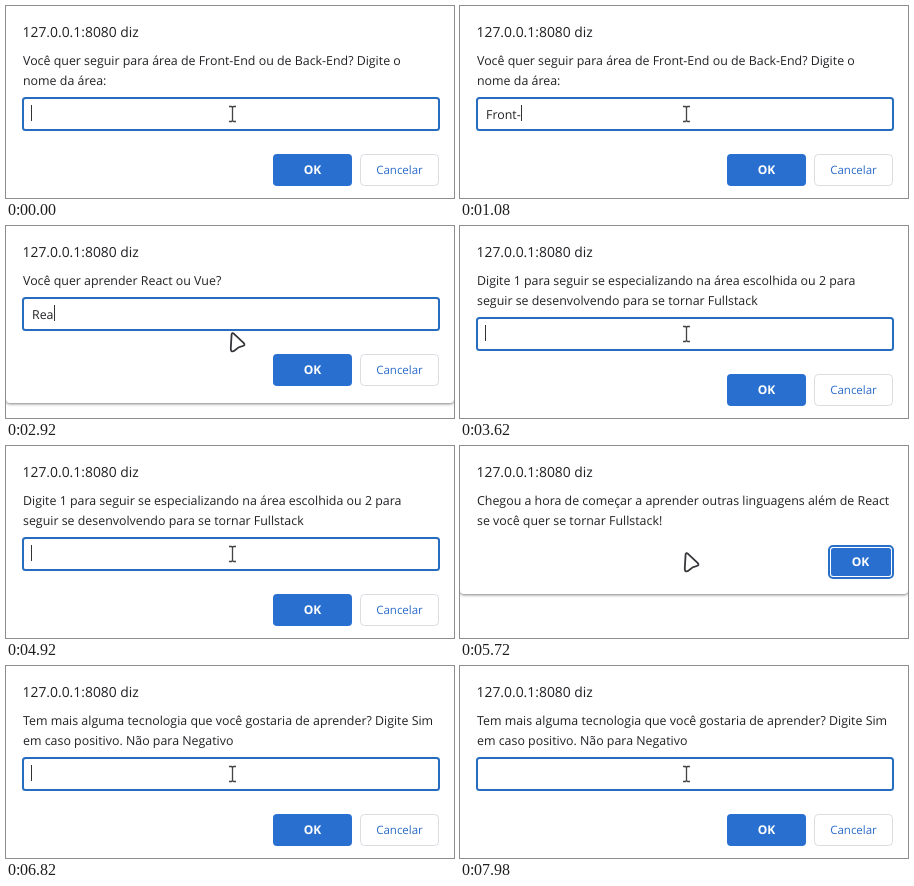
Write an HTML page that moves like this. It is 448 px wide and 192 px high and loops after 8000 ms.

```html
<!DOCTYPE html>
<html lang="pt-BR">
<head>
<meta charset="utf-8">
<title>Caixas de diálogo</title>
<style>
  html, body { margin: 0; width: 100%; height: 100%; overflow: hidden; background: #fff; }
  svg { display: block; width: 448px; height: 192px; font-family: "Open Sans", "Noto Sans", sans-serif; }
  text { white-space: pre; fill: #202124; font-size: 12.4px; text-rendering: geometricPrecision; }
  .title { font-size: 13.9px; }
  .label { font-size: 11.5px; font-weight: 500; text-anchor: middle; fill: #2a6cc8; }
  .light { font-size: 12px; font-weight: 700; fill: #fff; }
  .panel { fill: #fff; filter: drop-shadow(0 1px 1.5px rgba(0, 0, 0, .5)); }
  .field { fill: #fff; stroke: #266dc0; stroke-width: 2; }
  .primary { fill: #286fd0; }
  .plain { fill: #fff; stroke: #dadce0; }
  .ring { fill: #fff; stroke: #286fc8; stroke-width: 2; }
  .caret { fill: #333; }
  .pointer { fill: #fff; stroke: #35353a; stroke-width: 1.8; stroke-linejoin: round; }
  .beam { fill: none; stroke: #444; stroke-width: 1.3; }
</style>
</head>
<body>
<svg viewBox="0 0 448 192" aria-label="Sequência de perguntas"></svg>
<script>
const LOOP = 8000, BLINK = 650;
const svg = document.querySelector('svg');

// start: when the dialog opens; typeAt and keyMs: typing start and pace
const dialogs = [
  { start: 0, lines: ['Você quer seguir para área de Front-End ou de Back-End? Digite o', 'nome da área:'],
    answer: 'Front-End', typeAt: 640, keyMs: 80 },
  { start: 1640, lines: ['Você quer aprender React ou Vue?'],
    answer: 'React', typeAt: 2640, keyMs: 100 },
  { start: 3420, lines: ['Digite 1 para seguir se especializando na área escolhida ou 2 para', 'seguir se desenvolvendo para se tornar Fullstack'],
    answer: '2', typeAt: 5060, keyMs: 100 },
  { start: 5360, lines: ['Chegou a hora de começar a aprender outras linguagens além de React', 'se você quer se tornar Fullstack!'], alert: true },
  { start: 6700, lines: ['Tem mais alguma tecnologia que você gostaria de aprender? Digite Sim', 'em caso positivo. Não para Negativo'],
    answer: '', typeAt: LOOP, keyMs: 100 }
];

function add(parent, tag, attrs, content = '') {
  const node = document.createElementNS('http://www.w3.org/2000/svg', tag);
  for (const key in attrs) node.setAttribute(key, attrs[key]);
  node.textContent = content;
  return parent.appendChild(node);
}

const box = (g, cls, x, y, width, height, rx) =>
  add(g, 'rect', { class: cls, x, y, width, height, rx });
const write = (g, cls, x, y, content) => add(g, 'text', { class: cls, x, y }, content);

function build(dialog) {
  const g = dialog.group = add(svg, 'g', {});
  const shift = dialog.lines.length * 20 - 40;
  box(g, 'panel', 0, -8, 448, (dialog.alert ? 156 : 205) + shift, 4);
  write(g, 'title', 16.5, 31, '127.0.0.1:8080 diz');
  dialog.lines.forEach((line, i) => write(g, '', 17, 59 + 20 * i, line));

  if (dialog.alert) {
    box(g, 'ring', 369, 100, 64, 32, 4);
    box(g, 'primary', 371, 102, 60, 28, 2.5);
    write(g, 'label light', 400.5, 120, 'OK');
  } else {
    box(g, 'field', 17, 92 + shift, 416, 32, 2.5);
    dialog.typed = write(g, '', 26, 112.5 + shift, '');
    dialog.caret = box(g, 'caret', 25, 99 + shift, 1, 16, 0);
    box(g, 'primary', 267, 148 + shift, 79, 32, 4);
    write(g, 'label light', 306.5, 168 + shift, 'OK');
    box(g, 'plain', 354.5, 148.5 + shift, 78, 31, 4);
    write(g, 'label', 393.5, 168 + shift, 'Cancelar');
  }

  if (dialog.alert || shift) {
    add(g, 'path', { class: 'pointer', d: 'M225.6 108.5Q226 106.2 228 107.8L237.6 116.8Q239.8 119.4 236.4 120.2Q232.6 120.8 230 123.4Q227 126.4 225.4 125Q224.6 124.2 224.8 122Z' });
  } else {
    add(g, 'path', { class: 'beam', d: 'M223 100.5h2.5l1 1l1-1h2.5M226.5 101.5v13M223 115.5h2.5l1-1l1 1h2.5' });
  }
}

function render(t) {
  const current = dialogs.findLast(d => t >= d.start);
  for (const d of dialogs) d.group.style.display = d === current ? '' : 'none';
  if (current.alert) return;

  const { answer, typeAt, keyMs, start, typed, caret } = current;
  const keys = t < typeAt ? 0 : Math.min(answer.length, Math.floor((t - typeAt) / keyMs) + 1);
  typed.textContent = answer.slice(0, keys);
  const since = keys ? typeAt + (keys - 1) * keyMs : start;
  caret.setAttribute('x', 25 + (keys ? Math.round(typed.getComputedTextLength()) + 1 : 0));
  caret.style.visibility = Math.floor((t - since) / BLINK) % 2 ? 'hidden' : 'visible';
}

dialogs.forEach(build);
const begin = performance.now();
function tick() {
  render((performance.now() - begin) % LOOP);
  requestAnimationFrame(tick);
}
tick();
</script>
</body>
</html>
```
